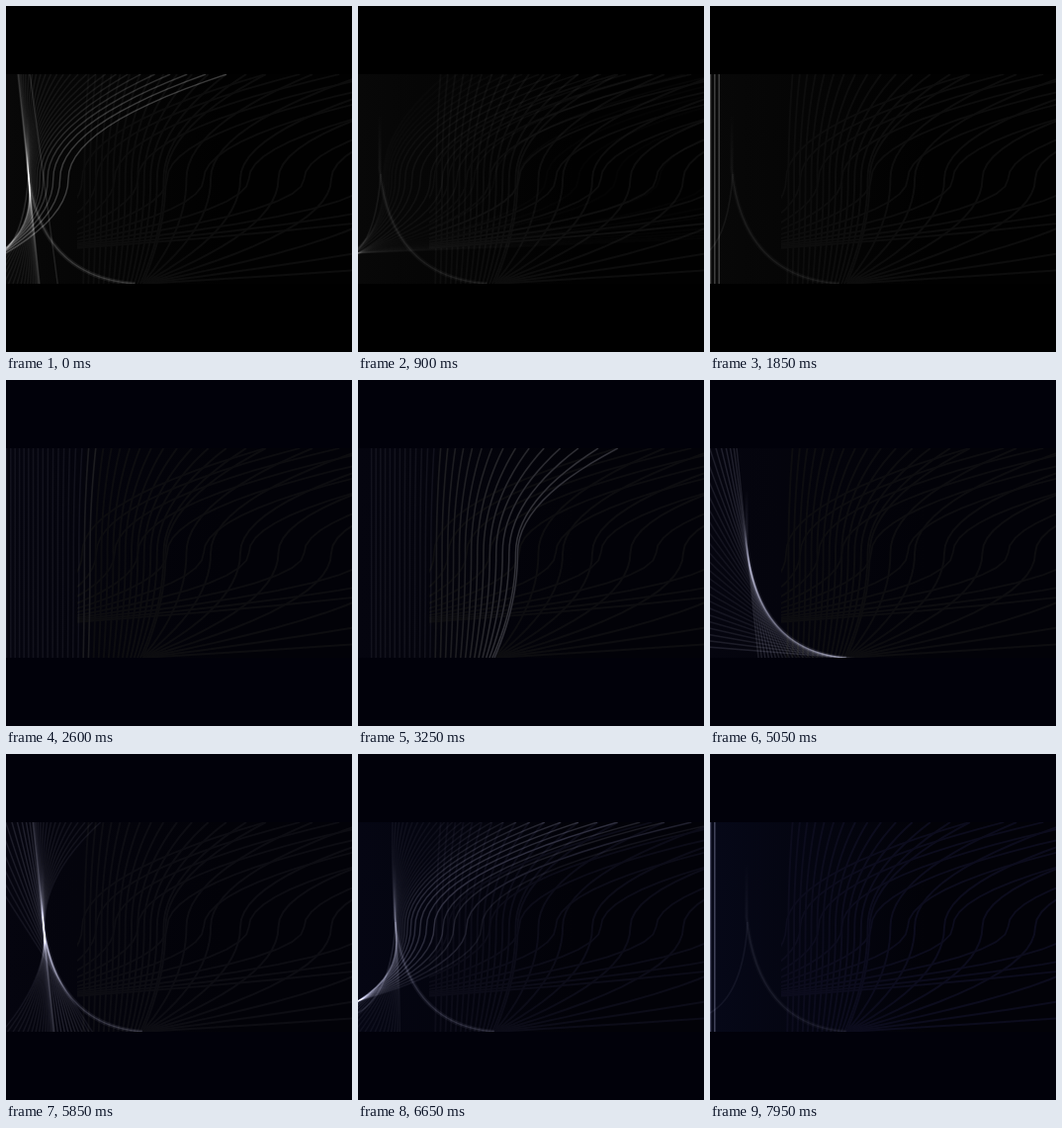
An HTML page with a canvas for the animation above (8 s loop, 350 by 350 pixels).

```html
<!DOCTYPE html>
<html>
<head>
<meta charset="utf-8">
<style>
html, body { margin: 0; width: 100%; height: 100%; overflow: hidden; background: #000; }
canvas { display: block; width: 350px; height: 350px; }
</style>
</head>
<body>
<canvas id="stage" width="350" height="350"></canvas>
<script>
const ctx = document.getElementById('stage').getContext('2d');
const LOOP = 8000, STEP = 50, COUNT = 28;
const SIZE = 350, TOP = 69, BOTTOM = 281, MID = 175, HALF = 106;

// Stages in the life of one thread, in ms.
const SWING = 1500, FLIP = 1950, TURN = 3300, EXIT = 4600, END = 5700;

// base: x of the narrow waist the threads pass through
const waves = [{ start: -4600, base: 23 }, { start: 1750, base: 38 }, { start: 7900, base: 38 }];

const ramp = (x, a, b) => Math.min(1, Math.max(0, (x - a) / (b - a)));
const bump = (x, at, width) => Math.exp(-(((x - at) / width) ** 2));

const light = s => 14 + 26 * bump(s, 1600, 420) + 14 * bump(s, 3150, 280) + 42 * bump(s, EXIT, 240);

function tone(v, blue) {
  const g = v * (blue ? 0.97 : 1);
  return `rgb(${g},${g},${v * (blue ? 1.08 : 1)})`;
}

function stroke(color, width) {
  ctx.strokeStyle = color;
  ctx.lineWidth = width;
  ctx.stroke();
}

// S-curve over the full height: two half parabolas meeting at x = mid.
function bend(mid, up, low, lean = 0) {
  ctx.beginPath();
  for (let v = -1; v <= 1.001; v += 1 / 14) {
    ctx.lineTo(mid + lean * v + v * v * (v > 0 ? up : -low), MID - v * HALF);
  }
}

// Upright thread drifting right while its ends spread.
function rise(s) {
  const e = (s / SWING) ** 5;
  bend(0.5 + 0.085 * s + 1.7e-5 * s * s, 99 * e, 28 * e);
}

// Pinned at the bottom, swinging right until it lies flat.
function swing(s) {
  const d = Math.max(20, FLIP - s);
  const reach = 45000 / d - 0.17 * d;
  bend(138 + reach, 72 + 1.25 * reach, reach);
}

// Straight tangent rolling along the edge curve.
function roll(s) {
  const t = (s - FLIP) / (TURN - FLIP), u = 1 - t;
  const x = u * u * 138 + 2 * u * t * 48 + t * t * 37;
  const y = u * u * 281 + 2 * u * t * 274 + t * t * 165;
  const dx = -90 * u - 11 * t, dy = -7 * u - 109 * t;
  ctx.beginPath();
  ctx.moveTo(x - 4 * dx, y - 4 * dy);
  ctx.lineTo(x + 4 * dx, y + 4 * dy);
}

// Top sweeps right, bottom left, then the whole thread leaves to the right.
function leave(s, base) {
  const q = (s - TURN) / (EXIT - TURN);
  const mid = base + (63 - base) * q ** 6;
  bend(mid, 160 * q * q, q < 1 ? 126 * q * q : 2 * mid, -11 * Math.max(0, 1 - q));
}

function thread(s, base) {
  if (s < SWING) rise(s);
  else if (s < FLIP) swing(s);
  else if (s < TURN) roll(s);
  else leave(s, base);
}

// Dim traces left standing on the right.
function afterglow(t, blue) {
  const late = ramp(t, 5200, 7700);
  const color = blue ? `rgb(${13 - late},${13 - late},${16 + late * 13})` : 'rgb(13,13,13)';
  ctx.save();
  ctx.beginPath();
  ctx.rect(72, TOP, SIZE - 72, BOTTOM - TOP);
  ctx.clip();
  for (let s = 800; s < FLIP; s += STEP) {
    thread(s, 38);
    stroke(color, 2);
  }
  for (let s = EXIT + 100; s < 5500; s += 75) {
    thread(s, 38);
    stroke(color, 1.8);
  }
  ctx.restore();
}

// Glow along the curve that the threads touch.
function edge(base, age, blue) {
  const v = 55 * ramp(age, 2700, 3300) - 32 * ramp(age, EXIT, 5600) - 23 * ramp(age, 6500, 7100);
  if (v <= 0) return;
  const shift = base - 38;
  const fade = k => {
    const g = ctx.createLinearGradient(0, 110, 0, 190);
    g.addColorStop(0, '#000');
    g.addColorStop(1, tone(v * k, blue));
    return g;
  };
  ctx.beginPath();
  ctx.moveTo(138 + shift / 2, BOTTOM);
  ctx.quadraticCurveTo(48 + shift, 274, base - 1, 165);
  ctx.lineTo(base - 1, 110);
  stroke(fade(0.3), 4);
  stroke(fade(0.6), 1.4);
  if (age < 4300) return;
  ctx.beginPath();
  ctx.moveTo(0, 262 + shift);
  ctx.quadraticCurveTo(base - 4, 242 + shift, base, 170);
  stroke(fade(0.6), 1.6);
}

function drawWave({ start, base }, t, blue) {
  const age = t - start;
  if (age < 0) return;
  edge(base, age, blue);
  const gain = (1 + 4 * (1 - ramp(age, 0, 500))) * (1 - ramp(age, EXIT, END));
  if (!gain) return;
  for (let i = 0; i < COUNT; i++) {
    const s = age - i * STEP;
    if (s < 0) break;
    thread(s, base);
    stroke(tone(light(s) * gain, blue), 1.4);
  }
}

function draw(t) {
  const blue = t >= 2600, late = ramp(t, 5800, 7600);
  ctx.globalCompositeOperation = 'source-over';
  ctx.fillStyle = blue ? '#01010a' : '#000';
  ctx.fillRect(0, 0, SIZE, SIZE);
  ctx.save();
  ctx.beginPath();
  ctx.rect(0, TOP, SIZE, BOTTOM - TOP);
  ctx.clip();
  const haze = ctx.createLinearGradient(0, 0, 220, 0);
  haze.addColorStop(0, blue ? `rgb(${5 + late},${5 + late * 3},${15 + late * 9})` : 'rgb(8,8,8)');
  haze.addColorStop(1, blue ? 'rgb(2,2,8)' : 'rgb(1,1,1)');
  ctx.fillStyle = haze;
  ctx.fillRect(0, TOP, SIZE, BOTTOM - TOP);
  afterglow(t, blue);
  ctx.globalCompositeOperation = 'lighter';
  for (const wave of waves) drawWave(wave, t, blue);
  ctx.restore();
}

const begin = performance.now();
function tick() {
  const t = (performance.now() - begin) % LOOP;
  draw(Math.floor(t / STEP) * STEP);
  requestAnimationFrame(tick);
}
tick();
</script>
</body>
</html>
```
